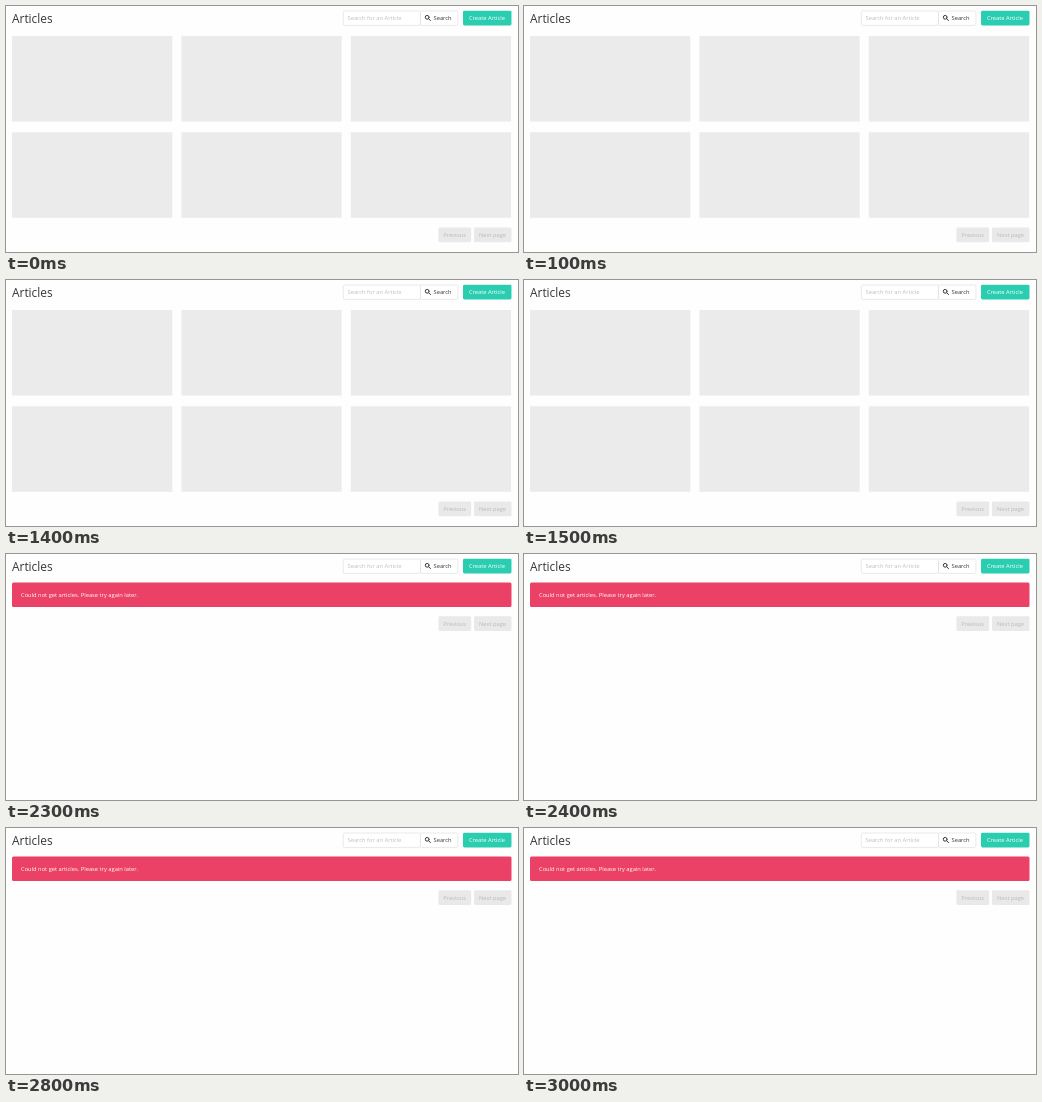
An HTML page that plays this animation: 512x246 px, repeating every 3.1 s.

```html
<!DOCTYPE html>
<html lang="en">
<head>
<meta charset="utf-8">
<title>Articles</title>
<style>
  html, body { margin: 0; width: 100%; height: 100%; overflow: hidden; background: #fefefe; }
  svg { display: block; width: 512px; height: 246px; }
  text { font: 5.75px "Open Sans", "Noto Sans", sans-serif; fill: #363636; }
  .title { font-size: 11.9px; font-weight: 500; }
  .hint { fill: #bdbdbd; }
  .light { fill: #fff; }
  .field { fill: #fff; stroke: #dbdbdb; stroke-width: .6; }
  .icon { fill: none; stroke: #363636; stroke-width: 1; stroke-linecap: round; }
  .disabled rect { fill: #e9e9e9; }
  .disabled text { fill: #b9b9b9; }
</style>
</head>
<body>
<svg viewBox="0 0 512 246">
  <defs>
    <linearGradient id="glow">
      <stop offset="0" stop-color="#f2f2f2" stop-opacity=".4"/>
      <stop offset=".4" stop-color="#f2f2f2"/>
      <stop offset=".75" stop-color="#f0f0f0"/>
      <stop offset="1" stop-color="#ebebec"/>
    </linearGradient>
  </defs>
  <text class="title" x="6" y="17">Articles</text>
  <rect class="field" x="337.3" y="5" width="77.2" height="14.4" rx="1.3"/>
  <text class="hint" x="341.5" y="14.4">Search for an Article</text>
  <rect class="field" x="414.5" y="5" width="37.4" height="14.4" rx="1.3"/>
  <path class="icon" d="M423.1 11.3a1.9 1.9 0 1 1-3.8 0a1.9 1.9 0 1 1 3.8 0M422.7 12.8l1.8 1.8"/>
  <text x="427.5" y="14.4">Search</text>
  <rect x="457" y="4.7" width="48.5" height="14.8" rx="1.4" fill="#2bcdb0"/>
  <text class="light" x="463" y="14.4">Create Article</text>

  <g id="loading"></g>
  <g id="error">
    <rect x="6" y="28.5" width="499.5" height="24.5" rx="1.5" fill="#eb4166"/>
    <text class="light" x="15" y="43">Could not get articles. Please try again later.</text>
  </g>
  <g id="pager" class="disabled">
    <rect x="432.4" width="32.8" height="14.7" rx="1.4"/>
    <text x="437.2" y="9.6">Previous</text>
    <rect x="468" width="37.5" height="14.7" rx="1.4"/>
    <text x="473" y="9.6">Next page</text>
  </g>
</svg>
<script>
  const LOOP = 3100, FAIL_AT = 2300;
  const byId = id => document.getElementById(id);
  const loading = byId("loading"), error = byId("error"), pager = byId("pager");

  function addRect(x, y, width, height, fill) {
    const rect = document.createElementNS("http://www.w3.org/2000/svg", "rect");
    Object.entries({ x, y, width, height, fill }).forEach(([key, value]) => rect.setAttribute(key, value));
    return loading.appendChild(rect);
  }

  const glows = [];
  for (const y of [30, 126.3]) {
    for (let column = 0; column < 3; column++) {
      const x = 6 + column * 169.4;
      addRect(x, y, 160.3, 85.5, "#ebebec");
      glows.push(addRect(x, y, 0, 85.5, "url(#glow)"));
    }
  }

  function glowWidth(t) {
    if (t < 300 || t >= 1400) return 0;
    return t < 400 ? 24 : 48;
  }

  function render(t) {
    const failed = t >= FAIL_AT;
    loading.style.display = failed ? "none" : "";
    error.style.display = failed ? "" : "none";
    pager.setAttribute("transform", `translate(0 ${failed ? 62.3 : 221.5})`);
    glows.forEach(glow => glow.setAttribute("width", glowWidth(t)));
  }

  const start = performance.now();
  function tick() {
    render((performance.now() - start) % LOOP);
    requestAnimationFrame(tick);
  }
  tick();
</script>
</body>
</html>
```
